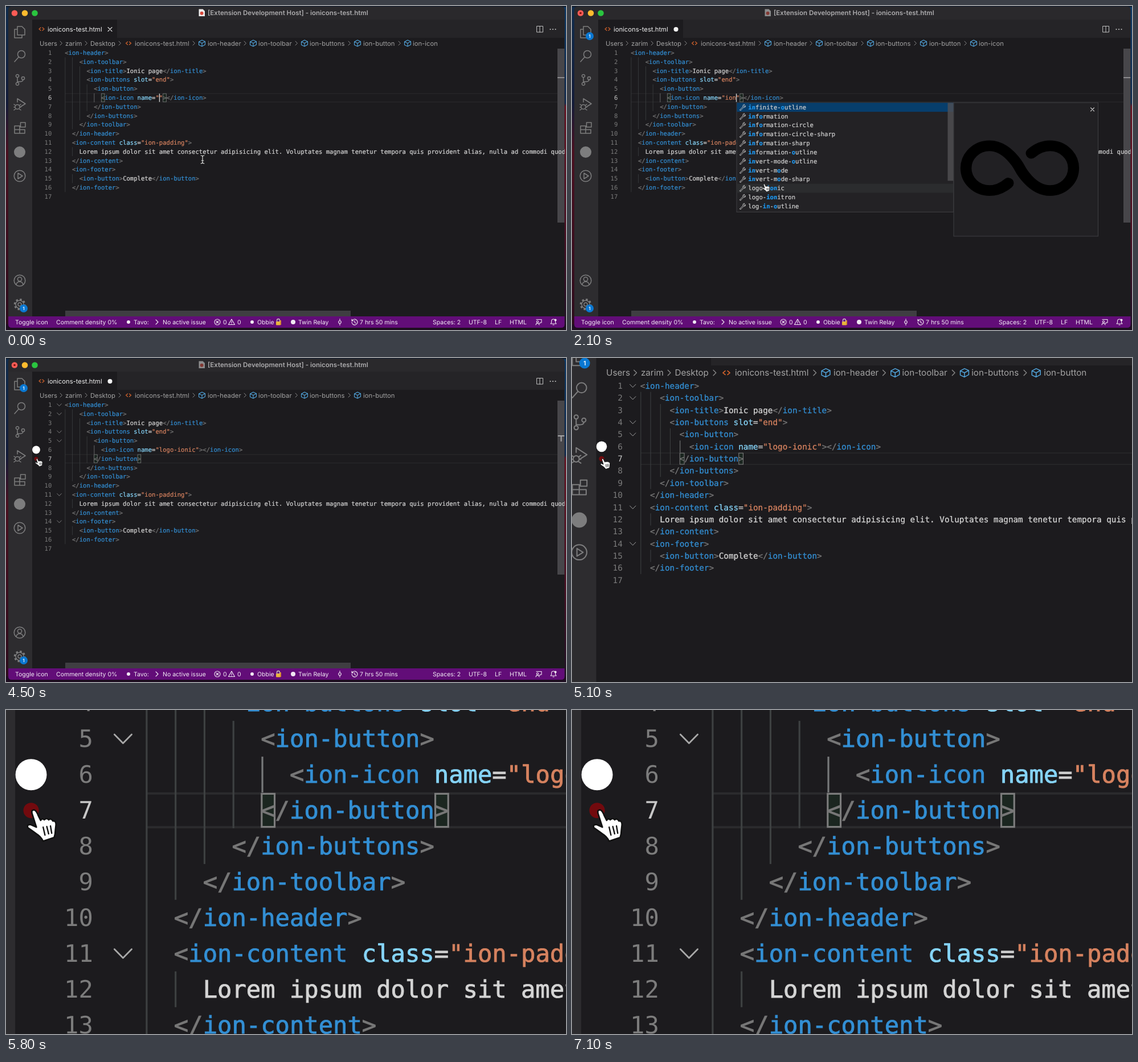
An HTML page that plays this animation: 983 px wide and 570 px high, repeating every 7200 ms.

```html
<!DOCTYPE html>
<html lang="en">
<head>
<meta charset="utf-8">
<title>Icon completion</title>
<style>
html, body { margin: 0; width: 100%; height: 100%; overflow: hidden; background: #1c1b1e; }
svg { display: block; width: 983px; height: 570px; overflow: hidden; }
text { white-space: pre; text-rendering: geometricPrecision; font-family: Inter, sans-serif; }
.mono { font-family: "DejaVu Sans Mono", monospace; font-size: 10.584px; fill: #d4d4d4; stroke-width: .22px; }
.ui { font-size: 11.25px; fill: #a3a3a3; }
.status { font-size: 10.5px; fill: #f4eef6; }
.line { fill: none; stroke-linecap: round; stroke-linejoin: round; }
</style>
</head>
<body>
<svg id="stage" viewBox="0 0 983 570">
  <defs>
    <linearGradient id="left" x2="0" y2="1">
      <stop offset="0" stop-color="#102c4c"/><stop offset=".3" stop-color="#131b38"/>
      <stop offset=".45" stop-color="#4a1020"/><stop offset="1" stop-color="#2c0b1c"/>
    </linearGradient>
    <linearGradient id="right" x2="0" y2="1">
      <stop offset="0" stop-color="#0e3a66"/><stop offset=".3" stop-color="#122c50"/>
      <stop offset=".31" stop-color="#6a1424"/><stop offset=".7" stop-color="#4a0f22"/>
      <stop offset="1" stop-color="#1c1026"/>
    </linearGradient>
    <clipPath id="pane"><rect x="46" y="24" width="934.5" height="522"/></clipPath>
  </defs>
  <g id="camera"></g>
</svg>
<script>
const LOOP = 7200, CW = 6.372, ROW = 15.8, X0 = 103.5;
const TYPED = [700, 850, 1000], POPUP = 1200, ACCEPT = 2200, CLICK = 3550;
const ZOOM_FROM = 4900, ZOOM_TIME = 900, ZOOM = 3.985, FOCUS = [56, 177.5];

const $ = id => document.getElementById(id);
const col = n => X0 + n * CW;
const mid = n => 177.25 + (n - 7) * ROW;
const rect = (x, y, w, h, fill, more = '') =>
  `<rect x="${x}" y="${y}" width="${w}" height="${h}" fill="${fill}" ${more}/>`;
const dot = (x, y, r, fill, more = '') => `<circle cx="${x}" cy="${y}" r="${r}" fill="${fill}" ${more}/>`;
const text = (x, y, s, cls, more = '') => `<text x="${x}" y="${y}" class="${cls}" ${more}>${s}</text>`;
const icon = (x, y, d, stroke, w = 1, more = '') =>
  `<path class="line" transform="translate(${x} ${y})" d="${d}" stroke="${stroke}" stroke-width="${w}" ${more}/>`;
const ring = (x, y, r) => `M${x - r} ${y}a${r} ${r} 0 1 0 ${2 * r} 0a${r} ${r} 0 1 0 ${-2 * r} 0`;
const span = (s, fill, more = '') =>
  `<tspan fill="${fill}" stroke="${fill}" ${more}>${s.replace(/</g, '&lt;').replace(/>/g, '&gt;')}</tspan>`;

// Syntax colouring
const TOKEN = /(<\/?)([\w-]+)|>|([\w-]+)(=)("[^"]*")|[^<>"]+?(?=[<>]|$|[\w-]+=")/g;
const paint = src => src.replace(TOKEN, (all, open, tag, attr, eq, str) =>
  open ? span(open, '#777') + span(tag, '#338fd4')
  : attr ? span(attr, '#86d4f8') + span(eq, '#cfcfcf') + span(str, '#d6825f')
  : span(all, all === '>' ? '#777' : '#d4d4d4'));

const iconLine = name => `<ion-icon name="${name}"></ion-icon>`;
const CODE = [
  [0, '<ion-header>'], [4, '<ion-toolbar>'], [6, '<ion-title>Ionic page</ion-title>'],
  [6, '<ion-buttons slot="end">'], [8, '<ion-button>'], [10, iconLine('')],
  [8, '</ion-button>'], [6, '</ion-buttons>'], [4, '</ion-toolbar>'], [2, '</ion-header>'],
  [2, '<ion-content class="ion-padding">'],
  [4, 'Lorem ipsum dolor sit amet consectetur adipisicing elit. Voluptates magnam tenetur ' +
      'tempora quis provident alias, nulla ad commodi quod'],
  [2, '</ion-content>'], [2, '<ion-footer>'], [4, '<ion-button>Complete</ion-button>'],
  [2, '</ion-footer>'], [0, '']
];
const GUIDES = [[0, 2, 16], [2, 2, 9], [2, 12, 12], [2, 15, 15], [4, 3, 8], [6, 5, 7]];
const FOLDS = [1, 2, 4, 5, 11, 14];

// Square brackets mark the matched letters
const ITEMS = ['[in]finite-[o]utline', '[in]f[o]rmation', '[in]f[o]rmation-circle',
  '[in]f[o]rmation-circle-sharp', '[in]f[o]rmation-sharp', '[in]formation-[o]utline',
  '[in]vert-mode-[o]utline', '[in]vert-m[o]de', '[in]vert-m[o]de-sharp',
  'logo-[ion]ic', 'logo-[ion]itron', 'log-[in]-[o]utline'];

function frameParts() {
  return rect(0, 0, 6, 570, 'url(#left)') + rect(977, 0, 6, 570, 'url(#right)') +
    rect(0, 0, 983, 2, '#101b2c') + rect(0, 560, 983, 10, '#1d0d20') +
    rect(4, 1, 976.5, 565, '#1c1b1e', 'rx="6"') +
    `<path d="M4 24V7q0-6 6-6H974.500q6 0 6 6V24z" fill="#2a292c"/>` +
    dot(15, 12.500, 5.3, '#fc5b55') + dot(33, 12.500, 5.3, '#fdbb2e') + dot(50.5, 12.500, 5.3, '#2ac53f') +
    dot(15, 12.500, 1.8, '#7c100c', 'id="dirtyLight"') +
    `<g id="doc"><path d="M338.500 5.500h7l3.500 3.500v9h-10.500z" fill="#eee"/>${dot(343.6, 12.8, 3, '#d9483b')}</g>` +
    text(354, 16.3, '[Extension Development Host] - ionicons-test.html', 'ui',
      'style="font-size:11.5px;font-weight:600;fill:#adacae"');
}

function tabBar() {
  const tagIcon = (x, y) => icon(x, y, 'M-1.500-2.500L-4.500 0l3 2.500M1.500-2.500L4.500 0l-3 2.500', '#d9652c', 1.2);
  const chev = x => icon(x, 65.5, 'M-2-3.500L1.500 0L-2 3.500', '#8a8a8a');
  const cube = x => icon(x, 65.5, 'M0-5.500L5.500-3V2.500L0 5.500L-5.500 3V-2.500zM-5.500-2.500L0 0L5.500-3M0 0V5.500', '#52a5dc', 1.1);
  const crumb = (x, s) => text(x, 69.5, s, 'ui');
  const tags = [[344, 354, 'ion-header'], [434, 443, 'ion-toolbar'], [524, 533, 'ion-buttons'], [617, 627, 'ion-button']];
  return rect(46, 24, 934.5, 32, '#252427') + rect(46, 24, 149, 32, '#1c1b1e') +
    tagIcon(62.5, 40.5) + text(73, 44.5, 'ionicons-test.html', 'ui', 'style="fill:#f0f0f0"') +
    icon(182.5, 41, 'M-3.500-3.500l7 7M3.500-3.500l-7 7', '#ddd', 1.1, 'id="close"') +
    dot(182.5, 41, 4, '#f2f2f2', 'id="dirtyDot"') +
    icon(937, 40.5, 'M-5-5H5.500V5.500H-5zM0-5V5.500', '#c0c0c0') +
    [955.500, 960, 964.500].map(x => dot(x, 41, 1.1, '#c0c0c0')).join('') +
    crumb(59, 'Users') + chev(97) + crumb(104, 'zarim') + chev(141) + crumb(148, 'Desktop') + chev(200) +
    tagIcon(215, 65.5) + crumb(226, 'ionicons-test.html') +
    tags.map(([c, x, s]) => chev(c - 14) + cube(c) + crumb(x, s)).join('') +
    `<g id="lastCrumb">${chev(691)}${cube(705)}${crumb(714, 'ion-icon')}</g>`;
}

function sideBar() {
  const g = '#7d7d7e';
  const side = (y, d) => icon(24, y, d, g, 1.5);
  const badge = (y, id) => `<g id="${id}">${dot(31, y, 7, '#0a78d2')}` +
    text(31, y + 2.9, '1', 'ui', 'text-anchor="middle" style="font-size:8px;font-weight:600;fill:#fff"') + '</g>';
  return rect(4, 24, 42, 522, '#2d2c2f') +
    side(46, 'M-4-10H4L9-5V5H-4zM-4-5H-9V10H4V5') +
    side(88, ring(3, -3, 6.500) + 'M-1.700 1.700L-9 10') +
    side(130, ring(-4, -7, 2.6) + ring(-4, 7, 2.6) + ring(6, -3, 2.6) + 'M-4-4.400V4.400M6-.4Q6 4-3 3') +
    side(173, 'M-4-4V-10L10-1L2 4' + ring(-4, 4.500, 4) + 'M-10 0l3 2M2 0l-3 2M-10 5h2M0 5h2M-10 10l3-2M2 10l-3-2') +
    side(215, 'M-9-4H0V9H-9zM-9 2.500H9V9H0M0 2.500H9M1.500-10H10V-2H1.500z') +
    dot(24, 257, 10, g) +
    side(299, ring(0, 0, 9.800) + 'M-3-5L5 0L-3 5z') +
    side(483, ring(0, 0, 9.800) + ring(0, -2.500, 3.600) + 'M-6 7Q-5 2 0 2T6 7') +
    side(525, ring(0, 0, 3) + ring(0, 0, 7)) +
    dot(24, 525, 8.800, 'none', `stroke="${g}" stroke-width="3" stroke-dasharray="3.400 3.510"`) +
    badge(53, 'fileBadge') + badge(532, 'gearBadge');
}

function statusBar() {
  const w = '#f0e8f2', ic = (x, d) => icon(x, 556, d, w, 1.1);
  const labels = [[16, 'Toggle icon'], [88, 'Comment density 0%'], [224, 'Tavo:'], [275, 'No active issue'],
    [381, '0'], [406, '0'], [441, 'Obbie'], [513, 'Twin Relay'], [621, '7 hrs 50 mins'],
    [749, 'Spaces: 2'], [812, 'UTF-8'], [858, 'LF'], [884, 'HTML']];
  return `<path d="M4 546H980.500V560q0 6-6 6H10q-6 0-6-6z" fill="#620d78"/>` +
    labels.map(([x, s]) => text(x, 559.8, s, 'status')).join('') +
    dot(215, 556, 3, w) + dot(432, 556, 3, w) + dot(504, 556, 4, w) +
    ic(265, 'M-2-4L2 0L-2 4') +
    ic(371, ring(0, 0, 5) + 'M-2-2l4 4M2-2l-4 4') +
    ic(396, 'M0-5L5.500 4.500H-5.500zM0-1.500V1.500M0 3v.2') +
    rect(474, 555, 8, 6.5, '#e9b63c', 'rx="1"') + icon(478, 556, 'M-2.500-1V-3a2.500 2.500 0 0 1 5 0V-1', '#c9c4c0', 1.3) +
    rect(481, 553, 2, 8, '#d58b2e') +
    ic(586, ring(0, 0, 2.300) + 'M0-5.500V-2.300M0 2.300V5.500') +
    ic(612, 'M-5 0a5 5 0 1 0 1.500-3.500L-5-2M-5-5V-2H-2M0-2.500V.5L2 2') +
    ic(935, ring(-2, -.5, 1.700) + 'M-5 5Q-4.500 2-2 2T1 5M-4-4.500H5V1H3L1.500 2.500') +
    ic(961, 'M-5 3H5L3.500 1V-1.500A3.500 3.500 0 0 0-3.500-1.500V1zM-1 5H1') + dot(964.5, 552.5, 2, w);
}

function editor() {
  const guides = GUIDES.map(([c, a, b]) =>
    rect(col(c), mid(a) - ROW / 2, .8, (b - a + 1) * ROW, '#3d4041')).join('');
  const box = id => rect(0, 0, 5.7, 14.6, '#1b2620', `id="${id}" stroke="#7c7c7c" stroke-width=".8"`);
  return '<g clip-path="url(#pane)">' +
    rect(968, 75, 12.5, 306, '#47464a') + rect(104, 536, 501, 10, '#3f3e42') +
    rect(968, 125, 12.5, 2, '#8c8b8e', 'id="rulerMark"') +
    icon(974.500, 141, 'M-5-4H5M0-4V5', '#a5a5a7', 2, 'id="rulerT"') +
    `<g id="current">${rect(104, 169.3, 864, 1, '#2b2b2d')}${rect(104, 184.2, 864, 1, '#2b2b2d')}</g>` +
    guides + rect(col(8), mid(6) - ROW / 2, .8, ROW, '#77797a') + box('open') + box('shut') +
    CODE.map(([c, s], i) => text(80.3, mid(i + 1) + 3.6, i + 1, 'mono', `id="n${i + 1}" text-anchor="end"`) +
      text(col(c) - .3, mid(i + 1) + 3.6, paint(s), 'mono', `id="c${i + 1}"`)).join('') +
    `<g id="folds">${FOLDS.map(n => icon(93.5, mid(n), 'M-3.800-1.900L0 2L3.800-1.900', '#a8a8a8', .7)).join('')}</g>` +
    dot(53, 161.5, 6.9, '#fff', 'id="gutter"') + dot(53, 177.3, 3.4, '#720a0e', 'id="hint"') +
    rect(0, 0, 1.3, 14.6, '#d8d8d8', 'id="caret"') + '</g>';
}

function popup() {
  const y0 = 170.3, step = 15.82, wrench = 'M-4.500 4.500L1-1M-3 5.500L2.500 0M1-1Q0-5 4-5L2.500-2.500L4-1L5.500-3Q6 1 2.500 0M-4.500 4.500q-.5 1 1.500 1';
  const rows = ITEMS.map((s, i) => {
    const label = s.split(/[[\]]/).map((p, k) => k % 2 ? span(p, '#1d96ee', 'font-weight="700"') : span(p, '#cfcfcf')).join('');
    const y = y0 + (i + .5) * step;
    return icon(299, y, wrench, '#c4c4c4', .9) + text(309.3, y + 3.6, label, 'mono');
  }).join('');
  return '<g id="popup">' + rect(289, 170, 381, 192.5, '#232225', 'stroke="#3f3f42"') +
    rect(289.5, y0, 380, step, '#073e6c') + rect(289.5, 0, 380, step, '#2b2c2e', 'id="hover"') + rows +
    rect(659.5, 170.5, 10, 137, '#525154', 'opacity=".8"') +
    rect(670, 170, 253.5, 235, '#212023', 'stroke="#3f3f42"') +
    icon(913.500, 182, 'M-3-3l6 6M3-3l-6 6', '#c8c8c8', 1.1) +
    `<path class="line" stroke="#000" stroke-width="46" transform="translate(786 285.300) scale(.4214 .41) translate(-256 -256)"
      d="M256 256s-48-96-126-96c-54.100 0-98 43-98 96s43.900 96 98 96c30 0 56.500-13.200 78-32M256 256s48 96 126 96c54.100 0 98-43 98-96s-43.900-96-98-96c-29.400 0-56.700 13.800-78 32"/></g>`;
}

function pointers() {
  const beam = 'M-3-7Q0-7 0-5V5Q0 7-3 7M3-7Q0-7 0-5M3 7Q0 7 0 5M-2 2H2';
  return `<g id="beam">${icon(0, 0, beam, '#111', 2.6)}${icon(0, 0, beam, '#e4e4e4', 1.2)}</g>
    <g id="hand"><g transform="translate(-1.400 -7.300) scale(.27) translate(-56 -177.500)" stroke="#111" stroke-linejoin="round">
    <path fill="#fff" stroke-width="2.500" d="M48 185Q46 178 52 179Q55 180 58 188L62 196Q64 192 68 195Q72 191 75 195Q79 192 82 197Q87 196 87 203L86 212Q86 218 84 224L66 230Q62 222 55 218Q47 212 41 208Q39 202 46 203L55 207z"/>
    <path class="line" stroke-width="2.200" d="M66 207l3 13M72 206l3 12M78 205l2 12"/></g></g>`;
}

$('camera').innerHTML = frameParts() + tabBar() + sideBar() + editor() + statusBar() + popup() + pointers();

const MOUSE = [[0, 345, 270], [1700, 345, 270], [2050, 340, 320], [2250, 340, 320], [2850, 248, 222],
  [3050, 248, 222], [3450, 245, 178], [3600, 245, 178], [4150, 57, 184], [LOOP, 57, 184]];
const ease = p => (1 - Math.cos(Math.PI * p)) / 2;

function mouseAt(t) {
  const i = MOUSE.findIndex(k => k[0] > t), [ta, xa, ya] = MOUSE[i - 1], [tb, xb, yb] = MOUSE[i];
  const p = ease((t - ta) / (tb - ta));
  return [xa + (xb - xa) * p, ya + (yb - ya) * p];
}
const show = (id, on) => $(id).setAttribute('visibility', on ? 'visible' : 'hidden');
const place = (id, x, y) => $(id).setAttribute('transform', `translate(${x} ${y})`);

let shown = '';
function draw(t) {
  const typed = TYPED.filter(k => t >= k).length;
  const name = t >= ACCEPT ? 'logo-ionic' : 'ion'.slice(0, typed);
  const dirty = typed > 0, moved = t >= CLICK, listed = t >= POPUP && t < ACCEPT;
  if (name !== shown) $('c6').innerHTML = paint(iconLine(shown = name));

  ['dirtyLight', 'dirtyDot', 'fileBadge'].forEach(id => show(id, dirty));
  show('close', !dirty);
  $('doc').setAttribute('opacity', dirty ? .5 : 1);
  show('lastCrumb', !moved);
  show('gutter', moved);
  show('rulerMark', !moved);
  show('rulerT', moved);

  const line = moved ? 7 : 6, end = 26 + name.length;
  place('current', 0, (line - 7) * ROW);
  place('open', col(moved ? 8 : 10) + .1, mid(line) - 7.3);
  place('shut', col(moved ? 20 : end + 1) + .1, mid(line) - 7.3);
  for (const n of [6, 7]) $('n' + n).style.fill = n === line ? '#c8c8c8' : '#7c7c7c';

  const touched = Math.max(...[0, ...TYPED, ACCEPT].filter(k => k <= t));
  place('caret', col(t >= ACCEPT ? end + 1 : end) - .4, mid(line) - 7.3);
  show('caret', !moved && (t - touched) % 1000 < 500);

  const [x, y] = mouseAt(t), inGutter = x < 62, away = t >= TYPED[0] && t < 1700;
  const hand = listed || inGutter;
  show('popup', listed);
  $('hover').setAttribute('y', 170.3 + Math.floor((y - 170.3) / 15.82) * 15.82);
  show('hand', !away && hand);
  show('beam', !away && !hand);
  place('hand', x, y);
  place('beam', x, y);
  show('folds', x < 104);
  show('hint', inGutter);

  const s = 1 + (ZOOM - 1) * ease(Math.min(1, Math.max(0, (t - ZOOM_FROM) / ZOOM_TIME)));
  $('camera').setAttribute('transform', `translate(${FOCUS[0] * (1 - s)} ${FOCUS[1] * (1 - s)}) scale(${s})`);
}

CODE.forEach((_, i) => $('n' + (i + 1)).style.fill = '#7c7c7c');
const start = performance.now();
function tick() {
  draw((performance.now() - start) % LOOP);
  requestAnimationFrame(tick);
}
draw(0);
tick();
</script>
</body>
</html>
```
